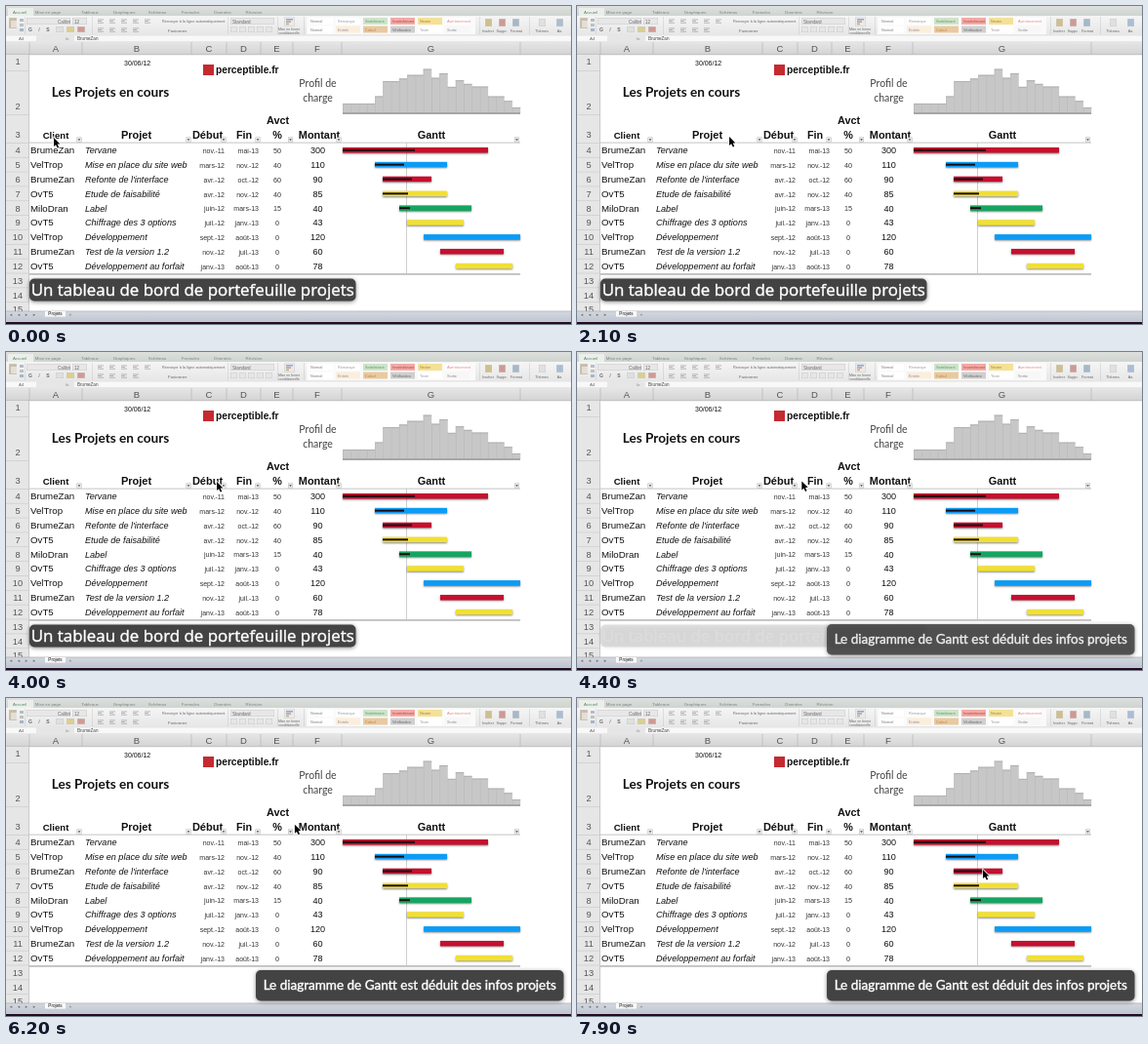
An HTML page with a canvas for the animation above (8000 ms loop, 579 px wide and 326 px high).

```html
<!DOCTYPE html>
<html lang="fr">
<head>
<meta charset="utf-8">
<title>Les Projets en cours</title>
<style>
html, body { margin: 0; width: 100%; height: 100%; overflow: hidden; background: #fff; }
canvas { display: block; width: 579px; height: 326px; }
</style>
</head>
<body>
<canvas id="stage" width="579" height="326"></canvas>
<script>
const W = 579, H = 326, LOOP = 8000;
const stage = document.getElementById('stage');
const sheet = document.createElement('canvas');
sheet.width = W;
sheet.height = H;
let ctx = sheet.getContext('2d');

const ARIAL = '"Liberation Sans", Arial, sans-serif';
const LATO = 'Lato, "Open Sans", sans-serif';
const OPEN = '"Open Sans", "Noto Sans", sans-serif';

const COLORS = { BrumeZan: '#c60f2f', VelTrop: '#0b9cf6', OvT5: '#f1e033', MiloDran: '#13a660' };
// client, project, start, end, progress, amount, bar left, bar right, progress right
const ROWS = [
  ['BrumeZan', 'Tervane', 'nov.-11', 'mai-13', 50, 300, 345, 494, 419],
  ['VelTrop', 'Mise en place du site web', 'mars-12', 'nov.-12', 40, 110, 378, 452, 408],
  ['BrumeZan', 'Refonte de l\'interface', 'avr.-12', 'oct.-12', 60, 90, 386, 436, 416],
  ['OvT5', 'Etude de faisabilité', 'avr.-12', 'nov.-12', 40, 85, 386, 452, 412],
  ['MiloDran', 'Label', 'juin-12', 'mars-13', 15, 40, 403, 477, 414],
  ['OvT5', 'Chiffrage des 3 options', 'juil.-12', 'janv.-13', 0, 43, 411, 469],
  ['VelTrop', 'Développement', 'sept.-12', 'août-13', 0, 120, 428, 527],
  ['BrumeZan', 'Test de la version 1.2', 'nov.-12', 'juil.-13', 0, 60, 445, 510],
  ['OvT5', 'Développement au forfait', 'janv.-13', 'août-13', 0, 78, 461, 519]
];
const EDGES = [24, 78, 190, 226, 261, 294, 344, 527];
const rowY = i => 148 + i * 14.85;

function rect(x, y, w, h, color) {
  ctx.fillStyle = color;
  ctx.fillRect(x, y, w, h);
}

function text(s, x, y, size, opt = {}) {
  ctx.font = `${opt.style || ''} ${size}px ${opt.family || ARIAL}`;
  ctx.textAlign = opt.align || 'left';
  ctx.fillStyle = opt.color || '#111';
  ctx.fillText(s, x, y);
}

function grad(y0, y1, a, b) {
  const g = ctx.createLinearGradient(0, y0, 0, y1);
  g.addColorStop(0, a);
  g.addColorStop(1, b);
  return g;
}

function button(x, y, w, h, fill = '#fbfbfb') {
  rect(x, y, w, h, '#b4b4b4');
  rect(x + 0.5, y + 0.5, w - 1, h - 1, fill);
}

function drawRibbon() {
  rect(0, 0, W, 10, grad(0, 10, '#dde0dd', '#cfd4d0'));
  rect(2, 2, 26, 8, '#eceeec');
  const tabs = [['Accueil', 14], ['Mise en page', 43], ['Tableaux', 86], ['Graphiques', 121],
    ['Schémas', 155], ['Formules', 189], ['Données', 222], ['Révision', 254]];
  tabs.forEach(([s, x], i) =>
    text(s, x, 8, 4.4, { align: 'center', color: i ? '#7b837d' : '#4c8a5a' }));

  rect(0, 10, W, 20, grad(10, 30, '#f5f5f5', '#e6e6e6'));
  ctx.save();
  ctx.globalAlpha = 0.6;
  button(3, 12, 8, 11, '#c7b48d');
  rect(5, 15, 6, 7, '#f7f7f7');
  for (let i = 0; i < 3; i++) rect(14, 13 + i * 5, 4, 3, ['#8b9aae', '#a2a2a2', '#7893b5'][i]);
  button(21, 12, 45, 7);
  text('Calibri', 53, 17.5, 4.6);
  button(68, 12, 15, 7);
  text('12', 70, 17.5, 4.6);
  ['G', 'I', 'S'].forEach((s, i) =>
    text(s, 25 + i * 9, 26.2, 5, { style: i === 1 ? 'italic' : 'bold', align: 'center' }));
  for (let i = 0; i < 3; i++) button(51 + i * 11, 21, 8, 6, ['#eee', '#e8d46a', '#d77b72'][i]);
  for (let i = 0; i < 9; i++) {
    const x = 92 + (i % 5) * 12, y = i < 5 ? 12 : 21;
    for (let k = 0; k < 3; k++) rect(x + 2, y + 1.6 + k * 1.6, 6 - k % 2 * 2, 0.7, '#666');
  }
  text('Renvoyer à la ligne automatiquement', 160, 17, 3.9);
  text('Fusionner', 166, 26.5, 4.4);
  button(230, 12, 45, 7);
  text('Standard', 232, 17.5, 4.6);
  for (let i = 0; i < 5; i++) button(230 + i * 9, 21, 7, 6);
  button(285, 11.5, 11, 9, '#fff');
  for (let i = 0; i < 3; i++) rect(287, 13 + i * 2.3, 7 - i * 2, 1.6, ['#4f83c4', '#d35b53', '#6ea04d'][i]);
  text('Mise en forme', 290, 24.5, 3.5, { align: 'center' });
  text('conditionnelle', 290, 28.5, 3.5, { align: 'center' });
  ctx.restore();

  const styles = [['Normal', '#fff', '#777'], ['Remarque', '#fff', '#999'], ['Satisfaisant', '#cfe3cb', '#5d9a5f'],
    ['Insatisfaisant', '#f3aaa5', '#b04a48'], ['Neutre', '#f4e197', '#a08335'], ['Avertissement', '#fff', '#df8580'],
    ['Normal', '#fff', '#777'], ['Entrée', '#fbeedb', '#8d8d9d'], ['Calcul', '#eac9a0', '#b98343'],
    ['Vérification', '#cfcfcf', '#666'], ['Texte', '#fff', '#999'], ['Sortie', '#f7f7f7', '#888']];
  rect(308, 11, 173, 18, '#fafafa');
  styles.forEach(([s, fill, color], i) => {
    const x = 310 + (i % 6) * 28, y = i < 6 ? 12 : 20.5;
    rect(x, y, 25, 7, fill);
    text(s, x + 2, y + 5, 3.8, { color });
  });
  ctx.save();
  ctx.globalAlpha = 0.6;
  ['#d2b767', '#cf7b72', '#8baeca', '#eee', '#92b6dc'].forEach((c, i) =>
    button([491, 505, 519, 546, 564][i], 13, 7, 8, c));
  ['Insérer', 'Suppr.', 'Format', 'Thèmes', 'Aa'].forEach((s, i) =>
    text(s, [494, 508, 523, 549, 567][i], 27, 3.8, { align: 'center' }));
  [19, 88, 227, 278, 305, 485, 536].forEach(x => rect(x, 11, 0.6, 18, '#bdbdbd'));
  ctx.restore();

  rect(0, 29.5, W, 7.5, '#e6e6e6');
  rect(0, 30.5, 31, 5.5, '#f8f8f8');
  text('A4', 13, 35, 4.4, { color: '#666' });
  rect(70, 30.5, W - 70, 5.5, '#f8f8f8');
  text('fx', 61, 35, 4.4, { style: 'italic', color: '#888' });
  text('BrumeZan', 73, 35, 4.6, { color: '#444' });
}

function drawHeaders() {
  rect(0, 37, W, 13, grad(37, 50, '#e6e6e6', '#d3d3d3'));
  rect(0, 49.5, W, 0.7, '#b5b5b5');
  EDGES.forEach(x => rect(x - 0.4, 37, 0.8, 13, '#bbb'));
  for (let i = 0; i < 7; i++)
    text('ABCDEFG'[i], (EDGES[i] + EDGES[i + 1]) / 2, 46.7, 9.5, { align: 'center', color: '#555' });

  rect(0, 50, 24, 264, '#e6e6e6');
  rect(23.3, 50, 0.7, 264, '#bbb');
  const mids = [56.5, 102.5, 132];
  for (let i = 0; i < 12; i++) mids.push(rowY(i));
  mids.forEach((y, i) => text(i + 1, 12, y + 3.1, 9.3, { align: 'center', color: '#555' }));
  [66, 111].forEach(y => rect(0, y, 24, 0.7, '#ccc'));
  for (let i = 0; i < 12; i++) rect(0, rowY(i) - 8, 24, 0.7, '#ccc');
}

function drawTitles() {
  text('30/06/12', 121, 61, 7);
  text('Les Projets en cours', 107, 92.5, 13.6, { style: 'bold', family: LATO, align: 'center' });
  rect(202, 60, 11, 11, '#c52a30');
  text('perceptible.fr', 215, 69.2, 10.2, { style: 'bold' });
  text('Profil de', 319.5, 83, 10.5, { family: LATO, align: 'center', color: '#444' });
  text('charge', 319.5, 97.5, 10.5, { family: LATO, align: 'center', color: '#444' });

  const mid = { style: 'bold', align: 'center' };
  text('Client', 51, 136, 9.6, mid);
  text('Projet', 133.5, 136, 11, mid);
  text('Début', 206.5, 136, 11, mid);
  text('Fin', 244, 136, 10.8, mid);
  text('Avct', 278.5, 121, 10.8, mid);
  text('%', 278, 136, 10.8, mid);
  text('Montant', 321, 136, 10.9, mid);
  text('Gantt', 436, 136, 10.9, mid);
  [75, 187, 223, 258, 291.5, 341, 523.5].forEach(x => {
    button(x - 2.5, 134.5, 5, 5, '#eee');
    ctx.fillStyle = '#555';
    ctx.beginPath();
    ctx.moveTo(x - 1.4, 136.3);
    ctx.lineTo(x + 1.4, 136.3);
    ctx.lineTo(x, 138.3);
    ctx.fill();
  });
}

// Monthly load: each project's amount spread evenly over its bar.
function drawLoad() {
  const months = 22, step = 182 / months;
  for (let m = 0; m < months; m++) {
    const x = 345 + m * step, mid = x + step / 2;
    let load = 0;
    for (const [, , , , , cost, x0, x1] of ROWS)
      if (mid > x0 && mid < x1) load += cost / (x1 - x0);
    const h = load * 5;
    rect(x, 110 - h, step + 0.2, h, '#c7c7c7');
    rect(x, 110 - h, step + 0.2, 1, '#b0b0b0');
    rect(x, 110 - h, 0.7, h, '#b9b9b9');
  }
  rect(345, 109, 182, 2, '#a6a6a6');
}

function drawTable() {
  rect(24, 139.7, 503, 0.8, '#b5b5b5');
  rect(24, 274.5, 503, 0.9, '#808080');
  rect(410, 140, 0.8, 135, '#c2c2c2');
  ROWS.forEach(([client, project, start, end, done, cost, x0, x1, xp], i) => {
    const y = rowY(i);
    text(client, 25, y + 3.2, 9.7);
    text(project, 81, y + 3.2, 9.1, { style: 'italic' });
    text(start, 224, y + 3, 7, { align: 'right', color: '#333' });
    text(end, 259, y + 3, 7, { align: 'right', color: '#333' });
    text(done, 278, y + 3, 7.2, { align: 'center', color: '#333' });
    text(cost, 319.5, y + 3.2, 9.1, { align: 'center' });
    ctx.save();
    ctx.shadowColor = 'rgba(0,0,0,.5)';
    ctx.shadowBlur = 2;
    ctx.shadowOffsetY = 1;
    rect(x0, y - 3, x1 - x0, 5.5, COLORS[client]);
    ctx.restore();
    if (xp) rect(x0, y - 1.2, xp - x0, 2, '#1c0b10');
  });
}

function drawFooter() {
  rect(0, 313, W, 11, grad(313, 324, '#d3d8e0', '#bfc5d0'));
  rect(0, 312.6, W, 0.7, '#aaa');
  for (let i = 0; i < 4; i++) text(i < 2 ? '◂' : '▸', 5 + i * 8, 318, 5, { align: 'center', color: '#777' });
  rect(40, 313, 21, 5.5, '#fafafa');
  text('Projets', 50.5, 317.2, 4.6, { align: 'center' });
  text('+', 66, 318, 5, { align: 'center', color: '#777' });
  rect(0, 324, W, 2, '#25091f');
}

function drawSheet() {
  rect(0, 0, W, H, '#fff');
  drawRibbon();
  drawHeaders();
  drawTitles();
  drawLoad();
  drawTable();
  drawFooter();
}

function caption(s, x, y, w, h, base, size, family, alpha) {
  if (alpha <= 0) return;
  ctx.save();
  ctx.globalAlpha = alpha;
  ctx.save();
  ctx.shadowColor = 'rgba(0,0,0,.45)';
  ctx.shadowBlur = 4;
  ctx.shadowOffsetY = 1;
  ctx.fillStyle = '#434343';
  ctx.beginPath();
  ctx.roundRect(x, y, w, h, 5);
  ctx.fill();
  ctx.restore();
  text(s, x + w / 2, base, size, { family, align: 'center', color: '#fff' });
  ctx.lineWidth = 0.4;
  ctx.strokeStyle = '#fff';
  ctx.strokeText(s, x + w / 2, base);
  ctx.restore();
}

// time, x, y of the pointer tip
const PATH = [[0, 49, 135], [800, 51, 134], [950, 58, 133], [1300, 113, 135], [1800, 140, 134],
  [2400, 172, 134], [2900, 182, 134], [3500, 204, 134], [4000, 216, 133], [4700, 241, 132],
  [5600, 271, 128], [6300, 300, 130], [7000, 322, 131], [7200, 353, 141], [7600, 398, 168], [7900, 416, 176]];

function pointerAt(t) {
  let i = 0;
  while (i < PATH.length - 2 && t >= PATH[i + 1][0]) i++;
  const [t0, x0, y0] = PATH[i], [t1, x1, y1] = PATH[i + 1];
  const k = Math.min(1, (t - t0) / (t1 - t0));
  return [x0 + (x1 - x0) * k, y0 + (y1 - y0) * k];
}

function drawPointer(x, y) {
  const pts = [[0, 0], [0, 9], [2.1, 7.2], [3.7, 10.6], [5.2, 9.9], [3.7, 6.6], [6.4, 6.4]];
  ctx.beginPath();
  pts.forEach(([dx, dy]) => ctx.lineTo(x + dx, y + dy));
  ctx.closePath();
  ctx.lineWidth = 1.4;
  ctx.strokeStyle = '#fff';
  ctx.stroke();
  ctx.fillStyle = '#000';
  ctx.fill();
}

function render(t) {
  ctx.drawImage(sheet, 0, 0);
  const mix = Math.max(0, Math.min(1, (t - 4100) / 350));
  caption('Un tableau de bord de portefeuille projets', 24, 279.5, 334.5, 23, 297, 16.9, OPEN, 1 - mix);
  caption('Le diagramme de Gantt est déduit des infos projets', 256, 279, 315.5, 31.5, 299.3, 13.5, LATO, mix);
  drawPointer(...pointerAt(t));
}

drawSheet();
ctx = stage.getContext('2d');
const begin = performance.now();
function tick() {
  render((performance.now() - begin) % LOOP);
  requestAnimationFrame(tick);
}
render(0);
requestAnimationFrame(tick);
</script>
</body>
</html>
```
